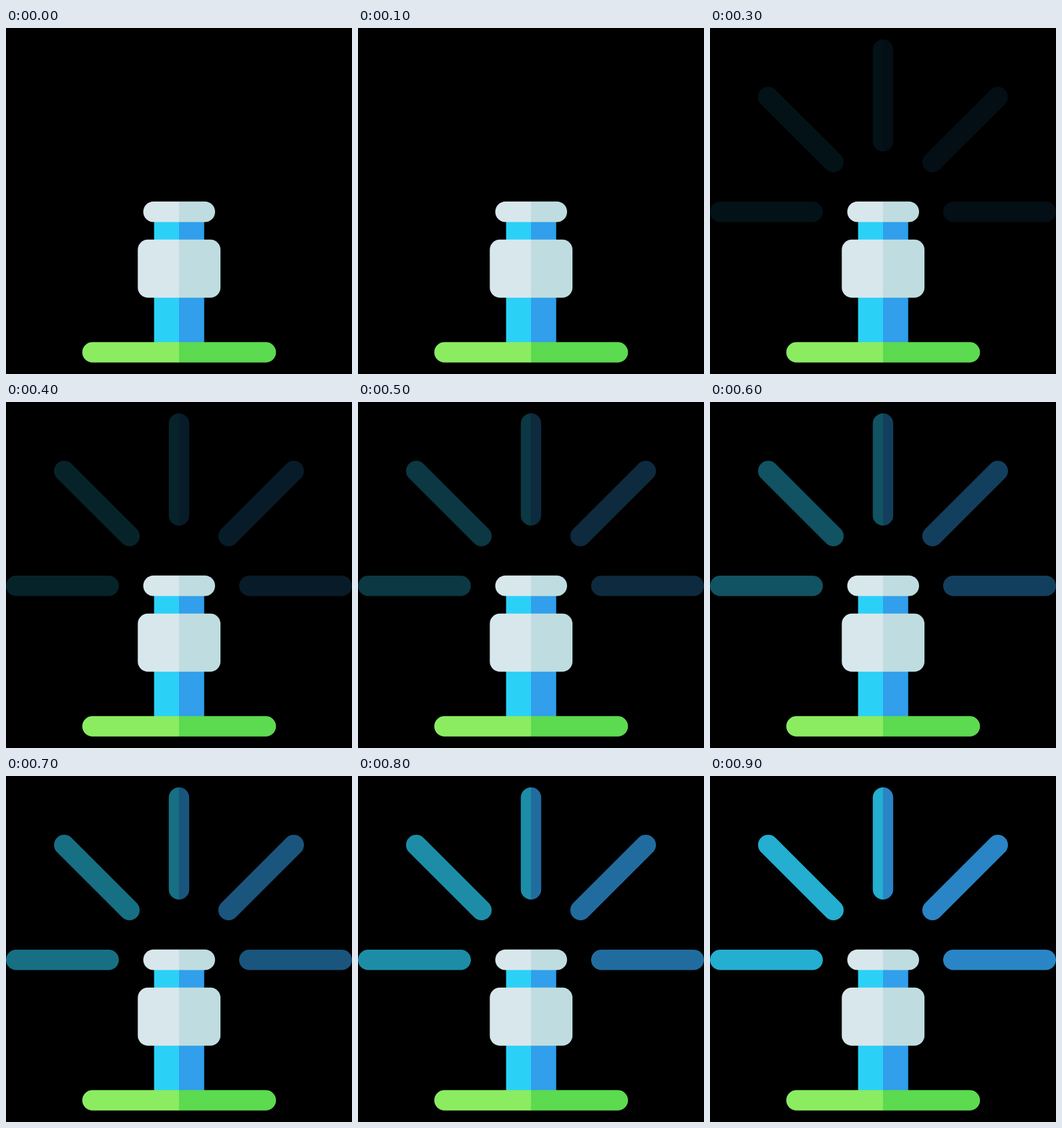
Write an HTML page that moves like this. It is 518 by 518 pixels and loops after 1 s.

```html
<!DOCTYPE html>
<html lang="en">
<head>
<meta charset="utf-8">
<title>Sprinkler</title>
<style>
  html, body { margin: 0; width: 100%; height: 100%; overflow: hidden; background: #000; }
  svg { display: block; width: 100vw; height: 100vh; }
  .spray { fill: none; stroke-width: 30.6; stroke-linecap: round; }
</style>
</head>
<body>
<svg viewBox="0 0 518 518">
  <defs>
    <clipPath id="left"><rect width="259" height="518"/></clipPath>
    <clipPath id="right"><rect x="259" width="259" height="518"/></clipPath>
    <g id="metal">
      <rect x="205.5" y="259.8" width="107.5" height="30.8" rx="15.4"/>
      <rect x="197.3" y="316.8" width="123.8" height="87" rx="15.2"/>
    </g>
    <rect id="pipe" x="221.7" y="285" width="75" height="190"/>
    <rect id="grass" x="114.2" y="470.2" width="290" height="30.6" rx="15.3"/>
    <path id="jets" d="M259 32.3V169.7M87.2 103.2L184.8 200.8M430.8 103.2L333.2 200.8M15.3 275.2H153.7M364.3 275.2H502.7"/>
  </defs>
  <g id="water" class="spray" opacity="0">
    <use href="#jets" stroke="#2bd0f7" clip-path="url(#left)"/>
    <use href="#jets" stroke="#319feb" clip-path="url(#right)"/>
  </g>
  <g clip-path="url(#left)">
    <use href="#pipe" fill="#2bd0f7"/>
    <use href="#metal" fill="#d8e7ec"/>
    <use href="#grass" fill="#8bec62"/>
  </g>
  <g clip-path="url(#right)">
    <use href="#pipe" fill="#319feb"/>
    <use href="#metal" fill="#bfdde0"/>
    <use href="#grass" fill="#5cda50"/>
  </g>
</svg>
<script>
  // Water opacity, held for a tenth of the loop each
  const levels = [0, 0, 0, 0.09, 0.17, 0.27, 0.4, 0.535, 0.68, 0.84];
  const steps = levels.map((opacity, i) => ({ opacity, offset: i / 10, easing: 'step-end' }));
  steps.push({ opacity: 0, offset: 1 });
  document.getElementById('water').animate(steps, { duration: 1000, iterations: Infinity });
</script>
</body>
</html>
```
